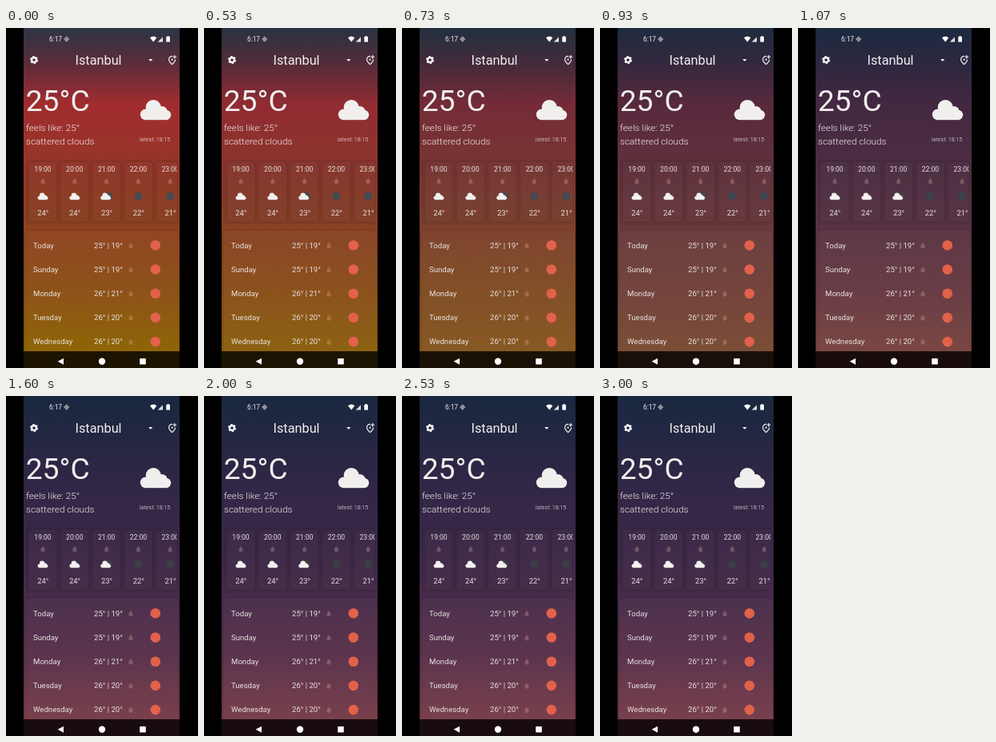
Animation, 240 px wide and 426 px high, one loop 3.19 s. Source, as an HTML page:

```html
<!DOCTYPE html>
<html lang="en">
<head>
<meta charset="utf-8">
<title>Weather</title>
<style>
@property --c0 { syntax: "<color>"; inherits: true; initial-value: #2d3443; }
@property --c1 { syntax: "<color>"; inherits: true; initial-value: #5c2d3b; }
@property --c2 { syntax: "<color>"; inherits: true; initial-value: #a12c2e; }
@property --c3 { syntax: "<color>"; inherits: true; initial-value: #8f3c24; }
@property --c4 { syntax: "<color>"; inherits: true; initial-value: #8a4e14; }
@property --c5 { syntax: "<color>"; inherits: true; initial-value: #8b6200; }
@property --moon { syntax: "<color>"; inherits: true; initial-value: #494b51; }
html, body { margin: 0; width: 100%; height: 100%; overflow: hidden; background: #000; }
#stage { position: relative; width: 240px; height: 426px; animation: dusk 3190ms infinite; }
#sky {
  position: absolute; left: 22px; top: 0; width: 195px; height: 426px;
  background: linear-gradient(var(--c0) 0, var(--c1) 45px, var(--c2) 95px,
    var(--c3) 215px, var(--c4) 330px, var(--c5) 405px);
}
svg { position: absolute; left: 0; top: 0; }
text { font-family: Roboto, sans-serif; fill: #f2eeee; }
.light { font-weight: 300; }
.mid { text-anchor: middle; }
.moon { fill: var(--moon); }
.card { fill: #fff; fill-opacity: .025; stroke: #000; stroke-opacity: .07; stroke-width: 2; }
#hours text, #days text { fill-opacity: .92; }
/* The sky cools in discrete 1/15 s ticks, then rests until the loop restarts. */
@keyframes dusk {
  0%, 2.08% {
    --c0: #2d3443; --c1: #5c2d3b; --c2: #a12c2e; --c3: #8f3c24; --c4: #8a4e14; --c5: #8b6200;
    --moon: #494b51; animation-timing-function: steps(7, end);
  }
  16.6% {
    --c0: #283241; --c1: #542c3a; --c2: #912b32; --c3: #883b29; --c4: #884e18; --c5: #8a5e0c;
    --moon: #474950; animation-timing-function: steps(3, end);
  }
  22.88% {
    --c0: #223040; --c1: #452a3a; --c2: #742b37; --c3: #7b3b30; --c4: #7f4b22; --c5: #84551e;
    --moon: #454850; animation-timing-function: steps(3, end);
  }
  29.15% {
    --c0: #1e2b3f; --c1: #35283e; --c2: #58293d; --c3: #65363c; --c4: #704038; --c5: #784a32;
    --moon: #3f464f; animation-timing-function: steps(4, end);
  }
  37.6%, 100% {
    --c0: #1a2840; --c1: #222741; --c2: #2e2645; --c3: #40294a; --c4: #593049; --c5: #763b48;
    --moon: #3c3d45;
  }
}
</style>
</head>
<body>
<div id="stage">
  <div id="sky"></div>
  <svg width="240" height="426" viewBox="0 0 240 426">
    <defs>
      <g id="cloud">
        <circle cx="16.5" cy="9.7" r="9.5"/>
        <circle cx="7" cy="18.6" r="6.9"/>
        <circle cx="27" cy="15.5" r="7.2"/>
        <circle cx="32.3" cy="19.3" r="6.2"/>
        <path d="M7 12H32V25.5H7z"/>
      </g>
      <path id="drop" d="M0-3.6C1.2-1.8 2.6-.5 2.6 1.2a2.6 2.6 0 0 1-5.2 0C-2.6-.5-1.2-1.8 0-3.6z"
        fill="#e9b3a0" fill-opacity=".3"/>
      <clipPath id="strip"><rect x="24" y="160" width="189.5" height="90"/></clipPath>
    </defs>

    <!-- status bar -->
    <text x="54" y="17" font-size="8.3">6:17</text>
    <rect x="-2.6" y="-2.6" width="5.2" height="5.2" fill="#94919a" transform="translate(75.7 14) rotate(45)"/>
    <g fill="#fff">
      <path d="M180 12.2a6.2 6.2 0 0 1 8.4 0L184.2 17.6z"/>
      <path d="M189.7 17.5h6.3v-6.3z" fill-opacity=".85"/>
      <path d="M200.3 11h1.2v-1h2.2v1h1.2v6.6h-4.6z"/>
    </g>

    <!-- title bar -->
    <g transform="translate(35 40)" fill="none" stroke="#fff">
      <circle r="2.9" stroke-width="2.2"/>
      <circle r="4.4" stroke-width="1.3" stroke-dasharray="2.4 2.208"/>
    </g>
    <text x="86.5" y="45.5" font-size="16.3">Istanbul</text>
    <path d="M178.2 39h5.2l-2.6 2.7z" fill="#fff"/>
    <g fill="none" stroke="#fff" stroke-width="1.1">
      <path d="M208 35.4c-2.6-.3-4.4 1.6-4.4 4 0 2.2 1.7 4.1 4 6.2 2.5-2.2 4-4.1 4-6.1"/>
      <path d="M210.8 34v4.6M208.5 36.3h4.6"/>
    </g>
    <circle cx="207.6" cy="39.6" r="1.1" fill="#fff"/>

    <!-- current conditions -->
    <text x="24.7" y="104.3" font-size="37.2">25°C</text>
    <g class="light" font-size="11.75">
      <text x="25" y="129">feels like: 25°</text>
      <text x="25" y="146">scattered clouds</text>
    </g>
    <text class="light" x="167" y="142" font-size="7.2">latest: 18:15</text>
    <use href="#cloud" x="167.7" y="89.7" fill="#f1efee"/>

    <!-- forecasts -->
    <rect x="24" y="164" width="191.5" height="82" rx="4" fill-opacity=".05"/>
    <g id="hours" clip-path="url(#strip)"></g>
    <path class="card" d="M23.5 405V258a5 5 0 0 1 5-5H211.5a5 5 0 0 1 5 5V405"/>
    <g id="days"></g>

    <!-- navigation bar -->
    <rect x="22" y="405" width="195" height="21" fill-opacity=".8"/>
    <g fill="#fff">
      <path d="M72 413.8v8l-7.4-4z"/>
      <circle cx="120" cy="417.8" r="4.2"/>
      <rect x="167.2" y="414" width="7.6" height="7.6" rx=".6"/>
    </g>
  </svg>
</div>
<script>
const hours = [["19:00", 24], ["20:00", 24], ["21:00", 23], ["22:00", 22], ["23:00", 21]];
const days = [["Today", 25, 19], ["Sunday", 25, 19], ["Monday", 26, 21],
  ["Tuesday", 26, 20], ["Wednesday", 26, 20]];

const smallCloud = x =>
  `<use href="#cloud" fill="#f4f1ef" transform="translate(${x - 6.5} 206.5) scale(.34)"/>`;

document.getElementById("hours").innerHTML = hours.map(([time, temp], i) => {
  const x = 46 + 39.8 * i;
  const moon = i > 1 ? `<circle class="moon" cx="${i === 2 ? x + 2 : x}" cy="211" r="5.2"/>` : "";
  return `<rect class="card" x="${x - 18}" y="167" width="36" height="76" rx="4"/>
    <text class="mid" x="${x}" y="180.2" font-size="8.6">${time}</text>
    <use href="#drop" x="${x}" y="191.5"/>${moon}${i < 3 ? smallCloud(i === 2 ? x - 1 : x) : ""}
    <text class="mid" x="${x + .3}" y="235.2" font-size="9.4">${temp}°</text>`;
}).join("");

document.getElementById("days").innerHTML = days.map(([name, high, low], i) => {
  const y = 272.3 + 30.2 * i;
  return `<g font-size="9.6"><text x="34" y="${y + 3.3}">${name}</text>
    <text x="110" y="${y + 3.3}">${high}° | ${low}°</text></g>
    <use href="#drop" x="156" y="${y}"/>
    <circle cx="186.8" cy="${y}" r="6.3" fill="#e2614b"/>`;
}).join("");
</script>
</body>
</html>
```
